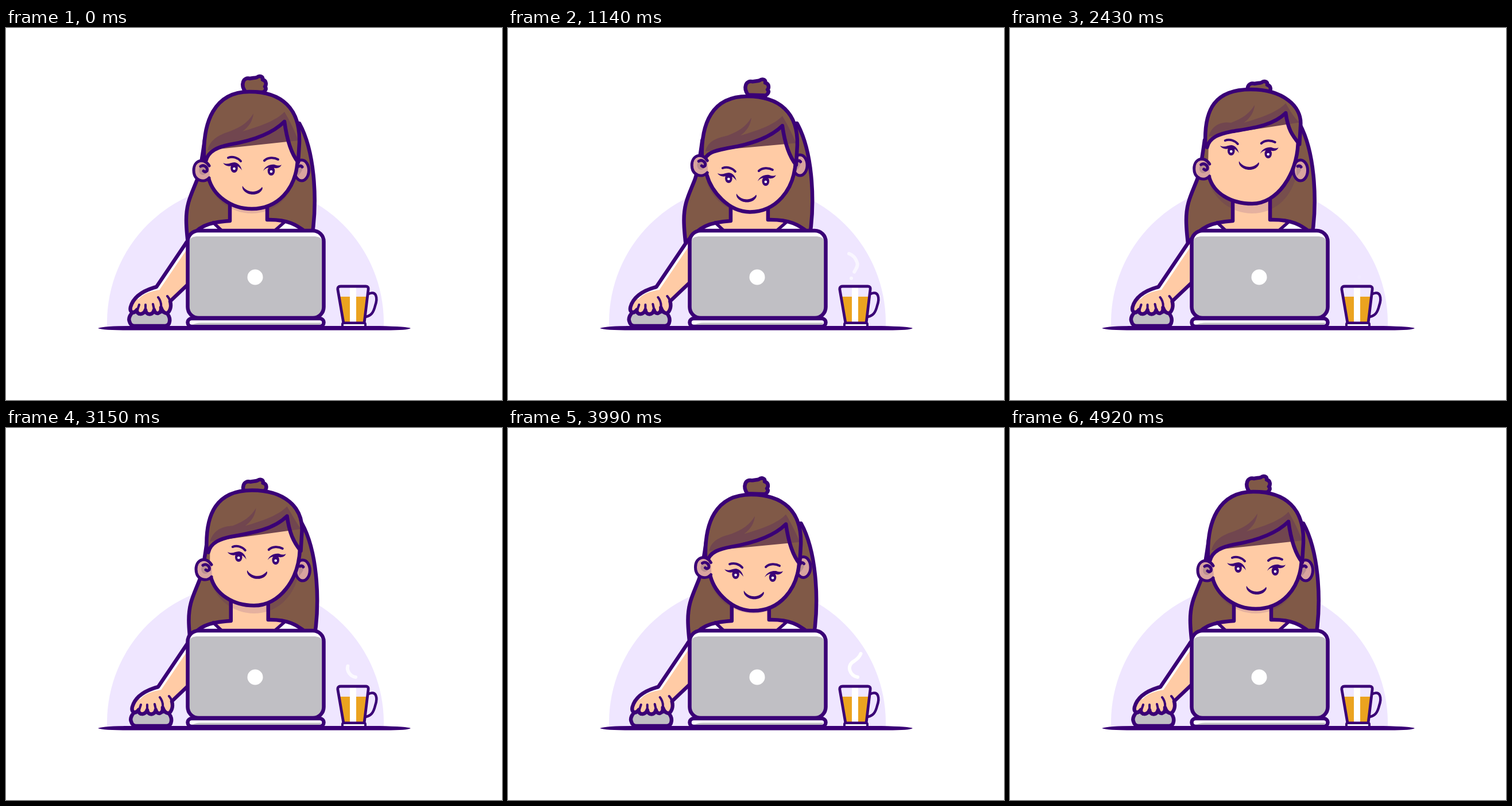
An HTML page that plays this animation: 864 px wide and 648 px high, repeating every 4.98 s.

```html
<!DOCTYPE html>
<html lang="en">
<head>
<meta charset="utf-8">
<title>Working at the laptop</title>
<style>
  html, body { margin: 0; width: 100%; height: 100%; overflow: hidden; background: #fff; }
  svg { display: block; width: 100vw; height: 100vh; }
  .ink { stroke: #3a0076; stroke-width: 6.5; stroke-linecap: round; stroke-linejoin: round; }
  .thin { stroke-width: 5; }
  .line { fill: none; }
  .hair { fill: #805947; }
  .skin { fill: #ffcba5; }
  .grey { fill: #c0bfc4; }
  .white { fill: #fff; }
  .ear { fill: #d8a49f; }
  .fold { fill: #bb8f90; }
  .dark { fill: #3a0076; }
  .steam { fill: none; stroke: #fff; stroke-width: 6; stroke-linecap: round; }
</style>
</head>
<body>
<svg viewBox="0 0 864 648">
  <path fill="#efe6ff" d="M176 523V513A241 241 0 0 1 658 513V523Z"/>

  <path id="back" class="hair ink"/>
  <path id="bun" class="hair ink" d="M417 111C408 99 413 85 425 88C430 87 434 87 437 86C442 82 449 85 447 90C455 92 453 100 451 102C455 106 451 110 448 112Z"/>

  <!-- shoulders and neck -->
  <path id="shirt" class="white"/>
  <path id="neck" class="skin"/>
  <path id="shade" fill="#3a0076" opacity=".13"/>
  <path id="shoulders" class="ink line"/>
  <path class="ink line" style="stroke-width:5.5" d="M361 339L377 354M484 339L467 354"/>

  <!-- head -->
  <g id="earR">
    <ellipse class="ear ink thin" cx="515" cy="248" rx="12.5" ry="18"/>
    <path class="fold" d="M508 238C518 236 520 248 508 258Z"/>
    <path class="ink line thin" d="M510 241Q514 239 516 242"/>
  </g>
  <path id="face" class="skin"/>
  <path id="jaw" class="ink line"/>
  <path id="fringe" class="hair"/>
  <path id="streak" fill="#71464f"/>
  <path id="fringeLine" class="ink line"/>
  <g id="earL">
    <path class="ear" d="M354 239C345 225 327 230 327 248C327 266 345 272 355 261Z"/>
    <ellipse class="fold" cx="343" cy="248" rx="7" ry="8"/>
    <path class="ink line thin" d="M354 240C345 225 327 230 327 248C327 266 345 271 354 261M339 241C345 237 352 243 350 249Q347 252 344 249"/>
  </g>
  <g id="eyes">
    <g id="eye">
      <ellipse class="dark" cx="397.500" cy="244" rx="6.300" ry="8"/>
      <circle class="white" cx="397.500" cy="245" r="2.300"/>
    </g>
    <use href="#eye" x="64.500" y="5"/>
    <path class="dark" d="M378 235C387 239 391 234 398 234C405 235 409 240 411 248C406 241 401 239 396 239C389 242 382 241 378 235Z"/>
    <path class="dark" d="M448 249C452 240 460 237 468 238C473 240 477 240 480 238C477 245 470 245 464 243C457 242 452 244 448 249Z"/>
    <path class="ink line" style="stroke-width:4" d="M387 226C395 223 404 226 409 232M450 231C456 225 467 225 474 229"/>
  </g>
  <path id="mouth" class="dark" d="M412 275C416 282 424 285 430 285C437 285 443 281 446 277C449 279 444 290 430 290C418 290 410 281 412 275Z"/>

  <!-- mouse, hand and arm -->
  <g id="arm">
    <path class="grey ink" d="M223 494C216 498 213 506 215 511Q217 519 224 519H277Q284 519 285 511C286 505 283 498 277 494Z"/>
    <path class="skin" d="M314 374L262 451V480H284L335 430V374Z"/>
    <path class="skin" d="M262 452C240 457 222 468 217 486C215 495 222 499 228 491C227 500 240 501 243 491C244 501 256 501 258 491C260 500 271 499 270 487C272 493 277 499 282 496C289 490 288 478 284 468L275 460Z"/>
    <path class="line" stroke="#fff" stroke-width="4.500" stroke-linecap="round" d="M316 380L266 454C248 457 236 463 230 470"/>
    <path class="ink line" d="M314 374L262 451C240 457 222 468 217 486C215 495 222 499 228 491C227 500 240 501 243 491C244 501 256 501 258 491C260 500 271 499 270 487C272 493 277 499 282 496C287 491 288 483 286 476L328 436"/>
    <path class="ink line" style="stroke-width:4" d="M229 491L232 482M243 491V482M258 490L256 481M270 488C271 480 269 474 265 469M286 476Q284 470 281 467"/>
  </g>

  <!-- laptop -->
  <rect class="white" x="316.500" y="353" width="237" height="152" rx="19"/>
  <path class="grey" d="M319 373C320 365 326 363 335 363H535C544 363 550 365 551 373V488Q551 504 535 504H335Q319 504 319 488Z"/>
  <rect class="ink line" x="316.500" y="353" width="237" height="152" rx="19"/>
  <rect class="ink white" x="316.500" y="506" width="237" height="14" rx="7"/>
  <path class="grey" d="M324 517Q330 513.500 340 513.500H549Q549 517 545 517Z"/>
  <circle class="white" cx="434" cy="434" r="13.500"/>

  <!-- drink -->
  <path class="ink line" style="stroke-width:4.500" d="M632 463C645 457 648 470 643 484C640 496 636 501 627 503"/>
  <path fill="#efe6ff" d="M579 451H631L624 513H588Z"/>
  <path fill="#eba31f" d="M581 468H629L623 512H588Z"/>
  <path class="white" d="M599 452H610V512H599Z"/>
  <path class="ink line" style="stroke-width:4.800" d="M583 450H627Q632 450 631 456L624 514H588L578 456Q577 450 583 450Z"/>
  <rect class="ink white" style="stroke-width:4" x="586" y="514" width="40" height="7" rx="2"/>

  <path id="steam1" class="steam" pathLength="1" d="M598 436C598 428 612 418 608 408C606 402 602 396 594 393"/>
  <path id="steam2" class="steam" pathLength="1" d="M609 434C596 432 588 414 603 406C612 400 616 394 616 384"/>

  <path class="dark" d="M160 523Q172 519 215 519H650Q700 520 705 523Q700 527 650 526.500H215Q168 526.500 160 523Z"/>
</svg>
<script>
const LOOP = 4980;
// time, turn to the side, nod
const poses = [
  [0, 0, 0], [540, -2, 6], [1140, -7.5, 18], [1640, -10.5, -19],
  [2160, -7.5, -29], [2430, -7, -30], [2700, -7, -30], [3150, 4.4, -19],
  [3630, 10, 1], [3810, 7, 8], [4320, -13, 14], [4920, 0, 0], [LOOP, 0, 0]
];
const $ = id => document.getElementById(id);
const clamp = v => Math.max(0, Math.min(1, v));
const draw = (id, d) => $(id).setAttribute('d', d);
const move = (id, x, y) => $(id).setAttribute('transform', `translate(${x} ${y})`);
const at = (dx, dy) => (...c) => c.map((v, i) => (v + (i % 2 ? dy : dx)).toFixed(2)).join(' ') + ' ';

const rate = (i, c) => poses[i + 1]
  && i >= 0 ? (poses[i + 1][c] - poses[i][c]) / (poses[i + 1][0] - poses[i][0]) : 0;

// slope that keeps the curve from overshooting its keys
function slope(i, c) {
  const a = rate(i - 1, c), b = rate(i, c);
  return a * b > 0 ? 2 * a * b / (a + b) : 0;
}

function pose(t, c) {
  let i = 0;
  while (t >= poses[i + 1][0]) i++;
  const span = poses[i + 1][0] - poses[i][0], s = (t - poses[i][0]) / span;
  const ease = s * s * (3 - 2 * s);
  return poses[i][c] + (poses[i + 1][c] - poses[i][c]) * ease
    + span * s * (1 - s) * ((1 - s) * slope(i, c) - s * slope(i + 1, c));
}

function steam(id, tail, head, opacity) {
  const a = clamp(tail), b = clamp(head), el = $(id);
  el.style.strokeDasharray = `0 ${a} ${Math.max(b - a, 0.001)} 3`;
  el.style.opacity = b > a ? clamp(opacity) : 0;
}

function drawHead(X, Y) {
  const nod = (up, down) => Y * (Y < 0 ? up : down);
  const hx = 0.85 * X - 0.04 * Y, fx = 0.9 * X;

  const root = at(X, 0);
  draw('back', `M${root(346, 195)}C${root(342, 225, 338, 250, 333, 264)}C${root(322, 292, 314, 305, 314, 335)}`
    + `C${root(314, 355, 318, 385, 320, 400)}L${root(528, 390)}C${root(546, 310, 538, 215, 511, 166)}Z`);
  move('bun', 0.15 * Math.abs(X), 0.3 * Math.abs(Y));

  const top = at(hx, nod(0.13, 0.45)), tip = at(hx, nod(0.5, 0.4)), mid = at(hx, nod(0.75, 0.35)),
    left = at(hx, nod(0.8, 0.1)), lock = at(hx, nod(1.05, 0.25));
  const edge = `C${tip(462, 186)}${mid(425, 197, 390, 203)}`;
  const hair = `M${left(348, 232)}L${left(345, 225)}C${left(343, 165)}${top(362, 111, 424, 111)}`
    + `C${top(480, 111, 513, 140)}${lock(511, 200)}L${lock(509, 234)}`
    + `C${lock(496, 218)}${tip(489, 192, 485, 163)}${edge}C${mid(370, 207)}${left(352, 214, 348, 232)}Z`;
  draw('fringe', hair);
  draw('fringeLine', hair);
  draw('streak', `M${left(351, 213)}C${left(356, 192)}${mid(375, 185)}${tip(390, 180)}`
    + `C${tip(410, 172, 422, 164, 431, 149)}C${tip(430, 160, 424, 172, 412, 180)}`
    + `C${tip(440, 172, 470, 162, 485, 146)}C${tip(492, 158, 500, 172)}${lock(509, 196, 508, 232)}`
    + `C${lock(496, 218)}${tip(489, 192, 485, 163)}${edge}C${mid(370, 207)}${left(357, 210, 351, 213)}Z`);

  const cheek = at(fx, nod(0.1, -0.35)), chin = at(fx, 0.3 * Y), side = at(fx, nod(0.9, 0.1));
  const jaw = `C${cheek(361, 291)}${chin(391, 315, 428, 315)}C${chin(472, 315)}${side(506, 282, 508, 228)}`;
  draw('jaw', `M${cheek(353, 262)}${jaw}`);
  draw('face', `M${left(351, 215)}L${cheek(351, 255)}L${cheek(353, 262)}${jaw}L${side(506, 200)}L${tip(485, 150)}Z`);
  const under = at(fx, 6);
  draw('shade', `M${under(353, 262)}C${under(361, 291, 391, 317, 428, 317)}C${under(472, 317, 506, 282, 508, 228)}Z`);

  move('earL', 0.9 * X, nod(0.1, -0.5));
  move('earR', 0.85 * X + 0.1 * Math.min(Y, 0), nod(0, -0.5));
  move('eyes', 1.75 * X, Y);
  move('mouth', 1.85 * X, nod(1.43, 0.75));
}

function drawBody(X) {
  const hand = 0.6 * X + 0.015 * X * X, lean = 0.35 * X + 0.01 * X * X;
  const n = at(lean, 0), arm = at(hand, 0);
  const l = `M${arm(314, 374)}C332 346 352 338 ${n(390, 336)}`;
  const r = `${n(455, 334)}C490 333 508 343 525 358`;
  draw('shirt', `${l}L${r}V390H${314 + hand}Z`);
  draw('neck', `M362 339L380 358H465L484 338L${n(455, 334)}L${n(455, 295)}L${n(390, 295)}L${n(390, 336)}Z`);
  draw('shoulders', `${l}L${n(390, 300)}M${n(455, 300)}L${r}`);
  move('arm', hand, 0);
}

function frame(now) {
  const t = now % LOOP, X = pose(t, 1), Y = pose(t, 2);
  drawHead(X, Y);
  drawBody(X);
  steam('steam1', (t - 900) / 1000, t / 1000, Math.min(t / 600, (1650 - t) / 800));
  steam('steam2', 0, (t - 2400) / 1850, Math.min((t - 2350) / 1050, (4650 - t) / 600));
  requestAnimationFrame(frame);
}
const start = performance.now();
requestAnimationFrame(function first(now) { frame(Math.max(0, now - start)); });
</script>
</body>
</html>
```
